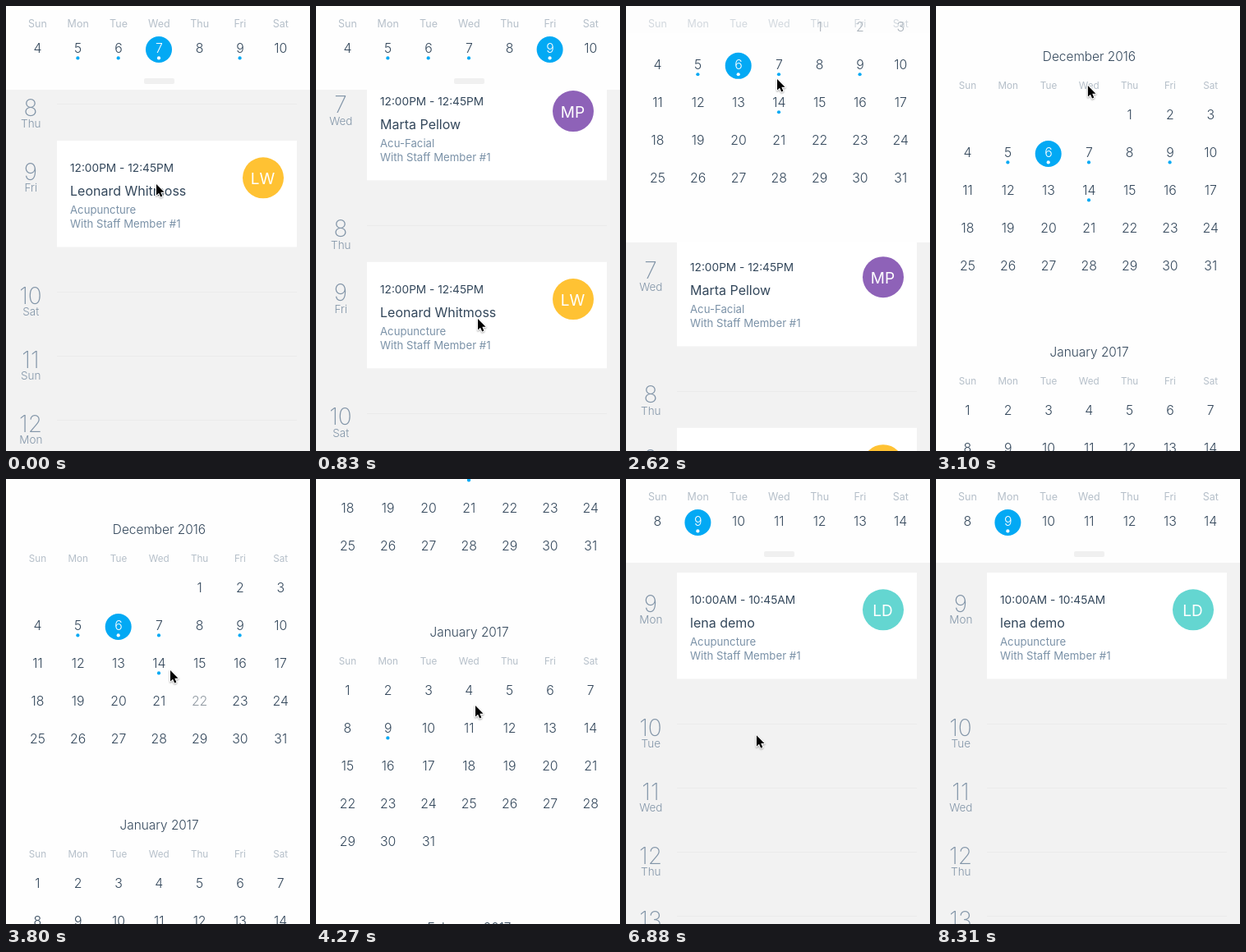
Animation, 370 px wide and 542 px high, one loop 8.55 s. Source, as an HTML page with a canvas:

```html
<!DOCTYPE html>
<html lang="en">
<head>
<meta charset="utf-8">
<title>Appointment calendar</title>
<style>
html, body { margin: 0; width: 100%; height: 100%; overflow: hidden; background: #f2f2f2; }
canvas { display: block; width: 370px; height: 542px; }
</style>
</head>
<body>
<canvas id="stage"></canvas>
<script>
const W = 370, H = 542, LOOP = 8550, STEP = 118.7, LAST = 70;
const HEAD = 102, ROW = 46, MONTH = 360, CARD_SLOT = 151, LINE_SLOT = 78;
const WHITE = '#fefefe', BLUE = '#03a9f4', INK = '#33475b', MUTED = '#8295a8', PALE = '#b5bfc9';
const FONT = 'Inter, Roboto, sans-serif';
const DAYS = ['Sun', 'Mon', 'Tue', 'Wed', 'Thu', 'Fri', 'Sat'];

const canvas = document.getElementById('stage');
const ctx = canvas.getContext('2d');
const ratio = window.devicePixelRatio || 1;
canvas.width = W * ratio;
canvas.height = H * ratio;

// first = weekday of the 1st
const MONTHS = [
  { name: 'December 2016', first: 4, days: 31, dots: [5, 6, 7, 9, 14] },
  { name: 'January 2017', first: 0, days: 31, dots: [9] },
  { name: 'February 2017', first: 3, days: 28, dots: [] }
];

const NOON = '12:00PM - 12:45PM';
const whitmoss = { time: NOON, name: 'Leonard Whitmoss', tag: 'LW', job: 'Acupuncture', color: '#ffc233' };
const pellow = { time: NOON, name: 'Marta Pellow', tag: 'MP', job: 'Acu-Facial', color: '#8e62b8' };
const demo = { time: '10:00AM - 10:45AM', name: 'lena demo', tag: 'LD', job: 'Acupuncture', color: '#64d6d1' };
const AGENDA = [
  { 5: pellow, 6: whitmoss, 7: pellow, 9: whitmoss, 14: pellow },
  { 9: demo }
];

const linear = p => p;
const smooth = p => p * p * (3 - 2 * p);
const settle = p => 1 - (1 - p) ** 4;

// Each move: begin step, end step, target, easing
const OPEN = [21, 25], CLOSE = [46, 51.45];
const calendarMoves = [[...OPEN, 61, smooth], [32, 36.7, -189, smooth], [...CLOSE, -426, settle]];
const decemberMoves = [[0, 2, 114, linear], [4, 9.84, 494, smooth], [...OPEN, 621, smooth]];
const januaryMoves = [[...CLOSE, 114, settle]];
const panelMoves = [[21, 24, 660, linear], [46, 48, HEAD, linear]];

// Where the hand stops: begin step, end step, x, y
const STOPS = [[0, 2, 183, 183], [4, 7, 197, 381], [7, 11, 198, 301], [13, 19, 184, 89], [25, 32, 200, 233],
  [32, 36, 194, 276], [38, 42, 326, 427], [42, 45, 100, 312], [50, 54, 136, 242], [54, 56, 155, 326],
  [57, 63, 208, 139], [64, 68, 328, 534]];

function follow(value, moves, step) {
  for (const [begin, end, target, ease] of moves) {
    if (step <= begin) break;
    value += (target - value) * ease(Math.min(1, (step - begin) / (end - begin)));
  }
  return value;
}

const hand = (axis, from, step) =>
  follow(from, STOPS.map(s => [s[0], s[1], s[2 + axis], smooth]), step);

function selection(step) {
  if (step < 2) return [0, 7];
  if (step < 11) return [0, 9];
  return step < 45 ? [0, 6] : [1, 9];
}

function rect(x, y, w, h, color) {
  ctx.fillStyle = color;
  ctx.fillRect(x, y, w, h);
}

function disc(x, y, r, color) {
  ctx.fillStyle = color;
  ctx.beginPath();
  ctx.arc(x, y, r, 0, Math.PI * 2);
  ctx.fill();
}

// y is the middle of the capital letters
function text(str, x, y, size, color, weight = 400, align = 'center') {
  ctx.font = `${weight} ${size}px ${FONT}`;
  ctx.textAlign = align;
  ctx.fillStyle = color;
  ctx.fillText(str, x, y + size * 0.364);
}

const colX = i => 38.4 + i * 49.3;

function weekdays(y, size) {
  DAYS.forEach((d, i) => text(d, colX(i), y, size, PALE));
}

function drawCard(c, y) {
  const line = (str, dy, size, color) => text(str, 78, y + dy, size, color, 400, 'left');
  rect(62, y, 292, 129.5, '#fff');
  line(c.time, 33, 13.7, INK);
  line(c.name, 61, 16, INK);
  line(c.job, 84, 13.2, '#7b92a8');
  line('With Staff Member #1', 101, 13.2, '#7b92a8');
  disc(313, y + 45.3, 25, c.color);
  text(c.tag, 312.5, y + 46, 19, '#fff');
}

function drawList(index, ninthTop) {
  const cards = AGENDA[index], first = MONTHS[index].first;
  const slot = d => cards[d] ? CARD_SLOT : LINE_SLOT;
  let y = ninthTop;
  for (let d = 8; d >= 5; d--) y -= slot(d);
  for (let d = 5; d <= 20; d++) {
    if (cards[d]) drawCard(cards[d], y);
    else rect(62, Math.round(y + 33), 292, 1, '#ebebeb');
    text(d, 30, y + 37.4, 28, MUTED, 200);
    text(DAYS[(first + d - 1) % 7], 30.3, y + 57.5, 13.5, MUTED, 300);
    y += slot(d);
  }
}

function drawMonth(index, y, step) {
  const m = MONTHS[index];
  const [selMonth, selDay] = selection(step);
  text(m.name, 186.5, y, 15.4, INK, 300);
  weekdays(y + 36, 11.7);
  for (let d = 1; d <= m.days; d++) {
    const cell = m.first + d - 1;
    const x = colX(cell % 7), cy = y + 71 + ROW * Math.floor(cell / 7);
    const on = index === selMonth && d === selDay;
    const pressed = index === 0 && d === 22 && step >= 31 && step <= 33;
    if (on) disc(x - 0.3, cy + 2, 16, BLUE);
    text(d, x, cy, 15.8, on ? '#fff' : pressed ? '#8f98a1' : INK, 300);
    if (m.dots.includes(d)) disc(x - 0.3, cy + 12.4, 2.1, on ? '#fff' : BLUE);
  }
}

function drawPanel(step) {
  const height = follow(HEAD, panelMoves, step);
  const top = follow(-66, calendarMoves, step);
  ctx.save();
  ctx.beginPath();
  ctx.rect(0, 0, W, height);
  ctx.clip();
  rect(0, 0, W, height, WHITE);
  MONTHS.forEach((m, i) => drawMonth(i, top + MONTH * i, step));

  // fixed weekday strip fades as the panel opens
  ctx.globalAlpha = Math.max(0, 1 - (height - HEAD) / 450);
  rect(0, 0, W, 33, WHITE);
  weekdays(21, 12.5);
  ctx.globalAlpha = 1;
  if (height === HEAD) {
    rect(0, 78, W, HEAD - 78, WHITE);
    ctx.fillStyle = '#f0f0f0';
    ctx.beginPath();
    ctx.roundRect(168, 88, 37, 7, 2);
    ctx.fill();
  }
  ctx.restore();
}

function drawPointer(x, y) {
  const shape = [[0, 0], [0, 15.5], [3.5, 12.3], [6, 17.8], [8.5, 16.7], [6.1, 11.3], [11, 11.3]];
  ctx.save();
  ctx.translate(x, y);
  ctx.scale(0.87, 0.87);
  ctx.beginPath();
  shape.forEach(p => ctx.lineTo(...p));
  ctx.closePath();
  ctx.lineJoin = 'round';
  ctx.lineWidth = 2.4;
  ctx.strokeStyle = '#fff';
  ctx.shadowColor = 'rgba(0,0,0,.35)';
  ctx.shadowBlur = 2 * ratio;
  ctx.shadowOffsetY = ratio;
  ctx.stroke();
  ctx.shadowColor = 'transparent';
  ctx.fillStyle = '#000';
  ctx.fill();
  ctx.restore();
}

function draw(ms) {
  // the picture advances in held steps
  const step = Math.min(LAST, Math.floor((ms + 8) / STEP));
  ctx.setTransform(ratio, 0, 0, ratio, 0, 0);
  rect(0, 0, W, H, '#f2f2f2');
  if (step < 40) drawList(0, follow(164, decemberMoves, step));
  else drawList(1, follow(-310, januaryMoves, step));
  drawPanel(step);
  if (step < LAST) drawPointer(hand(0, 183, step), hand(1, 217, step));
}

const start = performance.now();
function tick() {
  draw((performance.now() - start) % LOOP);
  requestAnimationFrame(tick);
}
tick();
</script>
</body>
</html>
```
